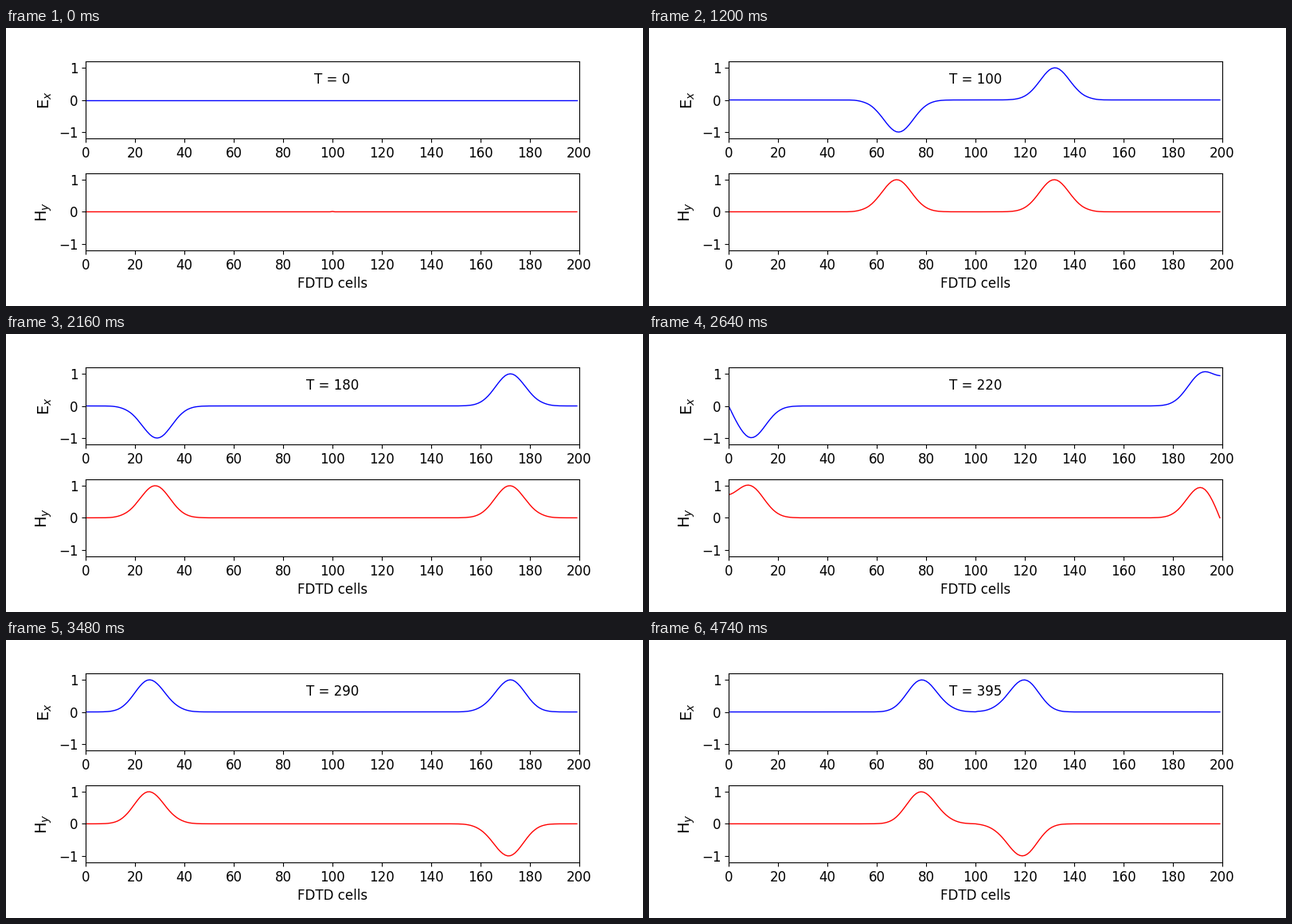
Animation, 800 px wide and 350 px high, one loop 4.8 s. Source, as a matplotlib script:

```python
import numpy as np
import matplotlib.pyplot as plt
from matplotlib.animation import FuncAnimation

CELLS = 200
SOURCE = 100
T0 = 36
SPREAD = 12
STEPS_PER_FRAME = 5
FRAMES = 80
INTERVAL = 60


def simulate(steps):
    """1D FDTD run with a hard Gaussian source in the magnetic field."""
    ex = np.zeros(CELLS)
    hy = np.zeros(CELLS)
    history = []
    for t in range(steps):
        ex[1:] += 0.5 * (hy[:-1] - hy[1:])
        hy[:-1] += 0.5 * (ex[:-1] - ex[1:])
        hy[SOURCE] = np.exp(-0.5 * ((T0 - t) / SPREAD) ** 2)
        history.append((ex.copy(), hy.copy()))
    return history


def field_axes(ax, label, color):
    ax.set_xlim(0, CELLS)
    ax.set_ylim(-1.2, 1.2)
    ax.set_xticks(np.arange(0, CELLS + 1, 20))
    ax.set_yticks([-1, 0, 1])
    ax.set_ylabel(label, fontsize=14)
    line, = ax.plot(np.zeros(CELLS), color=color, linewidth=1)
    return line


plt.rcParams["font.family"] = "DejaVu Sans"
plt.rcParams["font.size"] = 12

fig, (ax_e, ax_h) = plt.subplots(2, 1, figsize=(8, 3.5), dpi=100)
fig.subplots_adjust(left=0.125, right=0.9, top=0.88, bottom=0.2, hspace=0.45)

line_e = field_axes(ax_e, "E$_x$", "b")
line_h = field_axes(ax_h, "H$_y$", "r")
ax_h.set_xlabel("FDTD cells")
clock = ax_e.text(100, 0.5, "T = 0", horizontalalignment="center")

history = simulate(FRAMES * STEPS_PER_FRAME)


def update(frame):
    t = frame * STEPS_PER_FRAME
    ex, hy = history[t]
    line_e.set_ydata(ex)
    line_h.set_ydata(hy)
    clock.set_text(f"T = {t}")
    return line_e, line_h, clock


anim = FuncAnimation(fig, update, frames=FRAMES, interval=INTERVAL,
                     repeat=True, repeat_delay=0)
plt.show()
```
